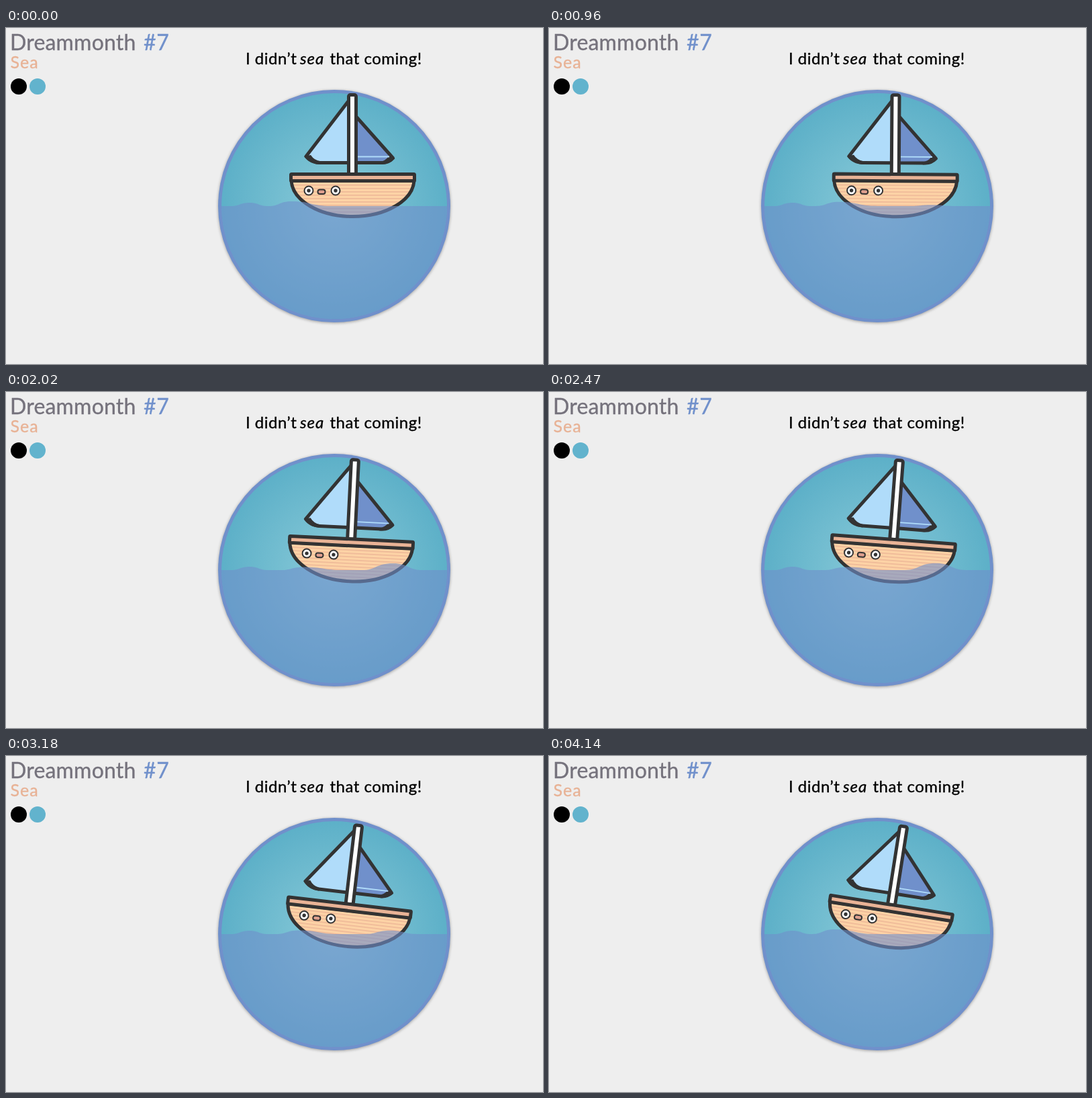
Recreate the animation shown at these times as an HTML page. Size 800 by 500 pixels, loop 4210 ms.

```html
<!DOCTYPE html>
<html lang="en">
<head>
<meta charset="utf-8">
<title>Sea</title>
<style>
  html, body { margin: 0; width: 100%; height: 100%; overflow: hidden; background: #eee; }
  svg { display: block; width: 800px; height: 500px; }
  text { font-family: Lato, "Open Sans", sans-serif; stroke-width: .35; }
  .ink { stroke: #333; stroke-width: 5; stroke-linejoin: round; }
  .face { stroke: #333; stroke-width: 2; }
  .orb { filter: drop-shadow(0 1px 2px rgba(0, 0, 0, .35)); }
</style>
</head>
<body>
<svg viewBox="0 0 800 500">
  <defs>
    <radialGradient id="sky" gradientUnits="userSpaceOnUse" cx="489" cy="265" r="168">
      <stop offset="0" stop-color="#8acbd9"/>
      <stop offset="1" stop-color="#5db0c8"/>
    </radialGradient>
    <pattern id="planks" patternUnits="userSpaceOnUse" x="0" y="233" width="10" height="5">
      <rect width="10" height="5" fill="#fdd3a6"/>
      <rect width="10" height="1.6" fill="#eeb897"/>
    </pattern>
    <clipPath id="porthole"><circle cx="489" cy="265" r="168"/></clipPath>
  </defs>

  <text x="6" y="32.500" font-size="32" letter-spacing=".2" fill="#75727c" stroke="#75727c">Dreammonth</text>
  <text x="205" y="32.500" font-size="32" letter-spacing=".6" fill="#7090cb" stroke="#7090cb">#7</text>
  <text x="6.500" y="60" font-size="25" letter-spacing="1" fill="#e8b295" stroke="#e8b295">Sea</text>
  <circle cx="19" cy="87" r="12"/>
  <circle cx="47" cy="87" r="12" fill="#62b3cd"/>
  <text y="54" font-size="24" letter-spacing=".5" stroke="#000"><tspan x="357">I didn’t</tspan> <tspan x="438" font-style="italic" letter-spacing="1">sea</tspan> <tspan x="482.500">that coming!</tspan></text>

  <circle class="orb" cx="489" cy="265" r="173" fill="#7090cb"/>
  <circle cx="489" cy="265" r="168" fill="url(#sky)"/>

  <g id="boat">
    <path class="ink" fill="#7090cb" d="M520 130L576.500 193.500Q570 200.500 561 200.500H520Z"/>
    <path fill="#333" d="M579.500 194L570 191Q565 198 557 199V203Q572 203 579.500 194Z"/>
    <path stroke="#b0dcfa" stroke-width="1.8" d="M523 191.500H571"/>
    <path class="ink" fill="#b0dcfa" d="M513 105L447 191Q456 200.500 468 200.500H513Z"/>
    <path fill="#333" d="M444 191L454 189Q459 197 469 198.500V203Q452 203 444 191Z"/>
    <rect class="ink" x="510.500" y="99.500" width="11" height="118" rx="2.500" fill="#fff"/>
    <path class="ink" fill="url(#planks)" d="M425 227C427 257 467 280.500 516.500 280.500S606 257 608 227Z"/>
    <rect class="ink" x="424.500" y="217.500" width="184" height="10" rx="1" fill="#e9b396"/>
    <g class="face">
      <circle cx="451" cy="242" r="6.500" fill="#fff"/>
      <circle cx="491" cy="242" r="6.500" fill="#fff"/>
      <rect x="464.500" y="240.500" width="11" height="6.500" rx="3" fill="#dfa08f"/>
    </g>
    <circle cx="451" cy="242" r="2.700" fill="#333"/>
    <circle cx="491" cy="242" r="2.700" fill="#333"/>
  </g>

  <path id="sea" clip-path="url(#porthole)" fill="#7090cb" fill-opacity=".6"/>
</svg>
<script>
const LOOP = 4210, LEVEL = 265;
const boat = document.getElementById('boat');
const sea = document.getElementById('sea');

// Half a cosine: 0 at phase 0, 1 at phase PI
const swell = phase => (1 - Math.cos(phase)) / 2;

function bump(left, peak, right, height) {
  const top = LEVEL - Math.max(0, height);
  const a = left + (peak - left) * .45, b = right - (right - peak) * .5;
  return `L${left} ${LEVEL}C${a} ${LEVEL} ${a} ${top} ${peak} ${top}` +
         `C${b} ${top} ${b} ${LEVEL} ${right} ${LEVEL}`;
}

function draw(t) {
  const tilt = 9.4 * swell(Math.max(0, t - 420) * Math.PI / 4340);
  boat.setAttribute('transform', `rotate(${tilt} 488 181)`);

  const e = swell((t - 145) / LOOP * 2 * Math.PI);
  sea.setAttribute('d', `M310 ${LEVEL}` +
    bump(336, 363, 390, 5) +
    bump(392 + 18 * e, 425 + 20 * e, 484 + 18 * e, 7 - 2.5 * e) +
    bump(545 - 15 * e, 565 + 12 * e, 600 + 22 * e, 13 * e - 2.5) +
    `L670 ${LEVEL}V440H310Z`);
}

function tick() {
  draw(performance.now() % LOOP);
  requestAnimationFrame(tick);
}
tick();
</script>
</body>
</html>
```
